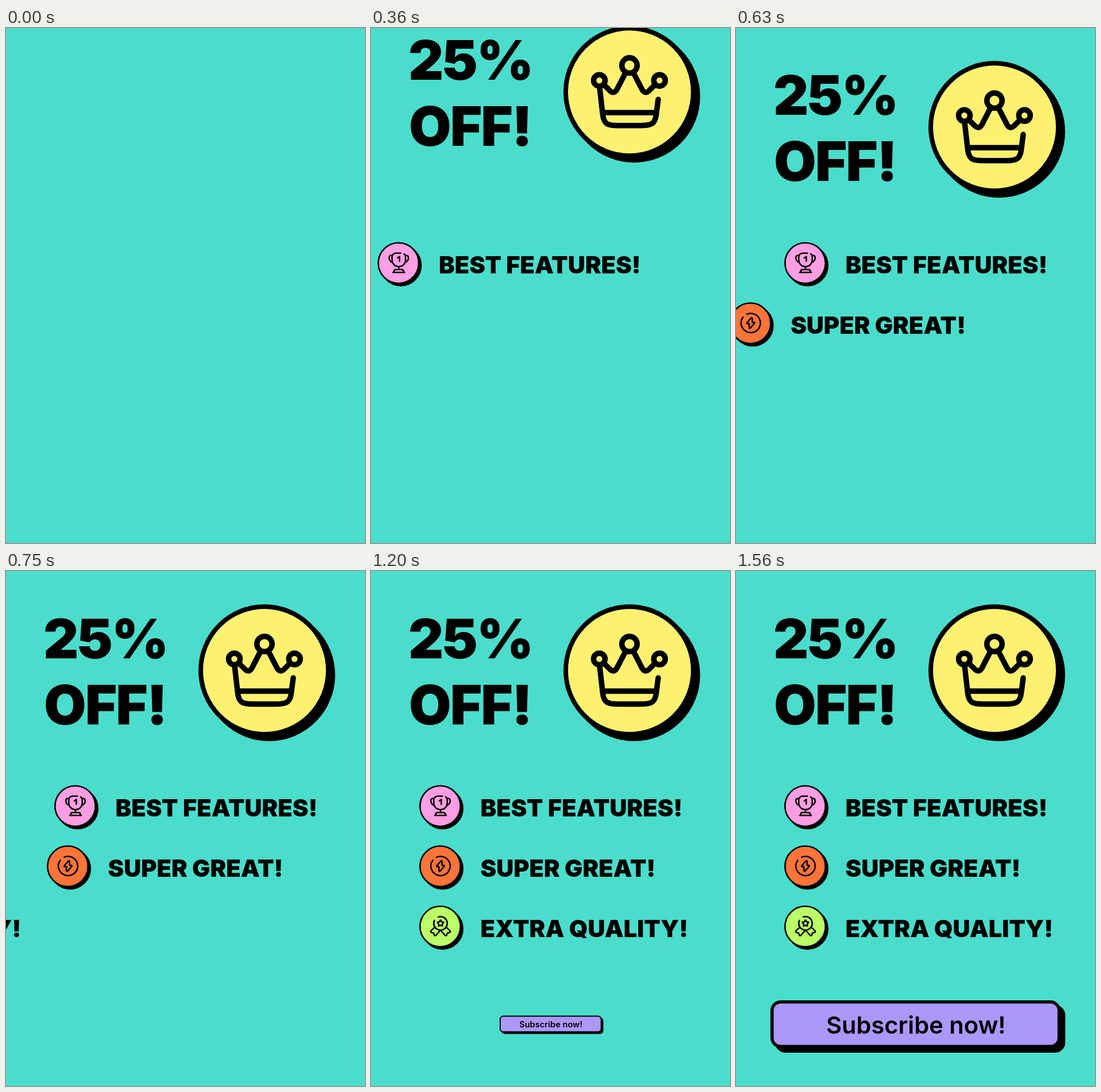
These frames come from a looping animation (625 by 896 pixels, 1800 ms). An HTML page with a canvas:

```html
<!DOCTYPE html>
<html lang="en">
<head>
<meta charset="utf-8">
<title>25% off</title>
<style>
  html, body { margin: 0; width: 100%; height: 100%; overflow: hidden; background: #4addcb; }
  canvas { display: block; width: 625px; height: 896px; }
</style>
</head>
<body>
<canvas id="stage" width="625" height="896"></canvas>
<script>
const ctx = document.getElementById('stage').getContext('2d');
const LOOP = 1800, STEP = 30;
const FONT = 'Inter, "Liberation Sans", sans-serif';

// Cubic Bézier easing through (x1, 0) and (x2, 1)
function bezier(x1, x2) {
  return x => {
    if (x <= 0) return 0;
    if (x >= 1) return 1;
    let low = 0, high = 1;
    for (let i = 0; i < 30; i++) {
      const p = (low + high) / 2, q = 1 - p;
      if (3 * x1 * p * q * q + 3 * x2 * p * p * q + p * p * p < x) low = p;
      else high = p;
    }
    return low * low * (3 - 2 * low);
  };
}
const glide = bezier(0.32, 0.24);
const swift = bezier(0.6, 0.2);

function circlePath(x, y, r, from = 0, to = Math.PI * 2) {
  const path = new Path2D();
  path.arc(x, y, r, from, to);
  return path;
}

function joinPaths(...parts) {
  const path = new Path2D();
  parts.forEach(part => path.addPath(part));
  return path;
}

// Flat shape with an outline and a hard black shadow
function badge(path, fill, line, offset) {
  ctx.lineWidth = line;
  ctx.save();
  ctx.translate(offset, offset);
  ctx.fill(path);
  ctx.stroke(path);
  ctx.restore();
  ctx.fillStyle = fill;
  ctx.fill(path);
  ctx.fillStyle = '#000';
  ctx.stroke(path);
}

// Places the left edge of the ink at x
function label(text, x, baseline, weight, size, spacing = 0) {
  ctx.font = `${weight} ${size}px ${FONT}`;
  ctx.letterSpacing = `${spacing * size}px`;
  ctx.fillText(text, x + ctx.measureText(text).actualBoundingBoxLeft, baseline);
}

function star(x, y, outer, inner) {
  const path = new Path2D();
  for (let i = 0; i < 10; i++) {
    const a = i * Math.PI / 5 - Math.PI / 2, r = i % 2 ? inner : outer;
    path.lineTo(x + r * Math.cos(a), y + r * Math.sin(a));
  }
  path.closePath();
  return path;
}

const crown = joinPaths(
  new Path2D(
    'M405 160L416 171Q423 177.5 428 169L442 142' +
    'M458 142L472 169Q477 177.5 484 171L495 160' +
    'M398 165L403.5 213C405.5 229 412 231.5 430 231.5H468' +
    'C488 231.5 494.5 229 496.5 213L500 186M404 209H496'),
  circlePath(450, 127, 13.3),
  circlePath(397.5, 153, 10),
  circlePath(502.3, 153, 10));

// Row icons live on a 24 unit grid
const mirror = new DOMMatrix([-1, 0, 0, 1, 24, 0]);

const handle = new Path2D('M5.2 4.3H4.5Q2 4.4 2 6.9C2 9 3.4 11 5.5 11.6');
const trophy = joinPaths(handle, new Path2D(
  'M14 2H9C6.8 2 5 3.8 5 6V9C5 12.9 8.1 16 12 16S19 12.9 19 9V6C19 4.7 18.4 3.5 17.4 2.8' +
  'M10.8 7L12.8 5.5V10.4M12 16V19M7 22V21Q7 19 9 19H15Q17 19 17 21V22M6 22H18'));
trophy.addPath(handle, mirror);

const bolt = joinPaths(circlePath(12, 12, 10, -1.99, 3.785), new Path2D(
  'M8.7 12.7H10.4V16.8Q10.6 18 11.6 17.2L15.8 12.4Q16.4 11.4 15.3 11.3' +
  'H13.6V7.2Q13.4 6 12.4 6.8L8.2 11.6Q7.6 12.6 8.7 12.7Z'));

const ribbon = new Path2D(
  'M6 13L2.1 16.8Q1.2 18 2.75 18.5L4.4 18.9Q5 19 5.1 19.6L5.5 21.1Q6 22.3 7.2 21.5L12 16');
const medal = joinPaths(ribbon, circlePath(12, 9, 7, -1.9, 3.6), star(12, 9, 3.4, 2));
medal.addPath(ribbon, mirror);

const rows = [
  { text: 'BEST FEATURES!', color: '#ff9ee2', icon: trophy, start: 24, time: 532 },
  { text: 'SUPER GREAT!', color: '#ff7438', icon: bolt, start: 314, time: 532 },
  { text: 'EXTRA QUALITY!', color: '#bbff66', icon: medal, start: 578, time: 576 }
];

const bigDisc = circlePath(450, 173, 111);
const smallDisc = circlePath(0, 0, 35.2);
const panel = new Path2D();
panel.roundRect(62.75, 749.75, 499.75, 77.5, 15);

function drawHeader(t) {
  ctx.save();
  ctx.translate(0, -296 * (1 - glide((t - 30) / 640)));
  label('25%', 68, 152, 900, 95, -0.02);
  label('OFF!', 69, 267, 900, 95, -0.02);
  badge(bigDisc, '#fff170', 8, 8);
  ctx.lineWidth = 9.5;
  ctx.stroke(crown);
  ctx.restore();
}

function drawRow(row, index, t) {
  const y = 409 + index * 104.75;
  ctx.save();
  ctx.translate(-625 * (1 - swift((t - row.start) / row.time)), y);
  label(row.text, 191.5, 18, 900, 41.6);
  ctx.translate(120.5, 0);
  badge(smallDisc, row.color, 2.6, 4);
  ctx.translate(0.5, -0.5);
  ctx.scale(1.68, 1.68);
  ctx.translate(-12, -12);
  ctx.lineWidth = 1.5;
  ctx.stroke(row.icon);
  ctx.restore();
}

function drawButton(t) {
  const scale = swift((t - 983) / 570);
  if (scale <= 0) return;
  ctx.save();
  ctx.translate(313, 788);
  ctx.scale(scale, scale);
  ctx.translate(-313, -788);
  badge(panel, '#ae97fb', 5.5, 8);
  label('Subscribe now!', 158, 804.5, 600, 41.6);
  ctx.restore();
}

function draw(t) {
  ctx.fillStyle = '#4addcb';
  ctx.fillRect(0, 0, 625, 896);
  ctx.fillStyle = ctx.strokeStyle = '#000';
  ctx.lineCap = ctx.lineJoin = 'round';
  drawHeader(t);
  rows.forEach((row, i) => drawRow(row, i, t));
  drawButton(t);
}

const begin = performance.now();
function tick() {
  const t = (performance.now() - begin) % LOOP;
  draw(Math.floor(t / STEP) * STEP);
  requestAnimationFrame(tick);
}
tick();
</script>
</body>
</html>
```
